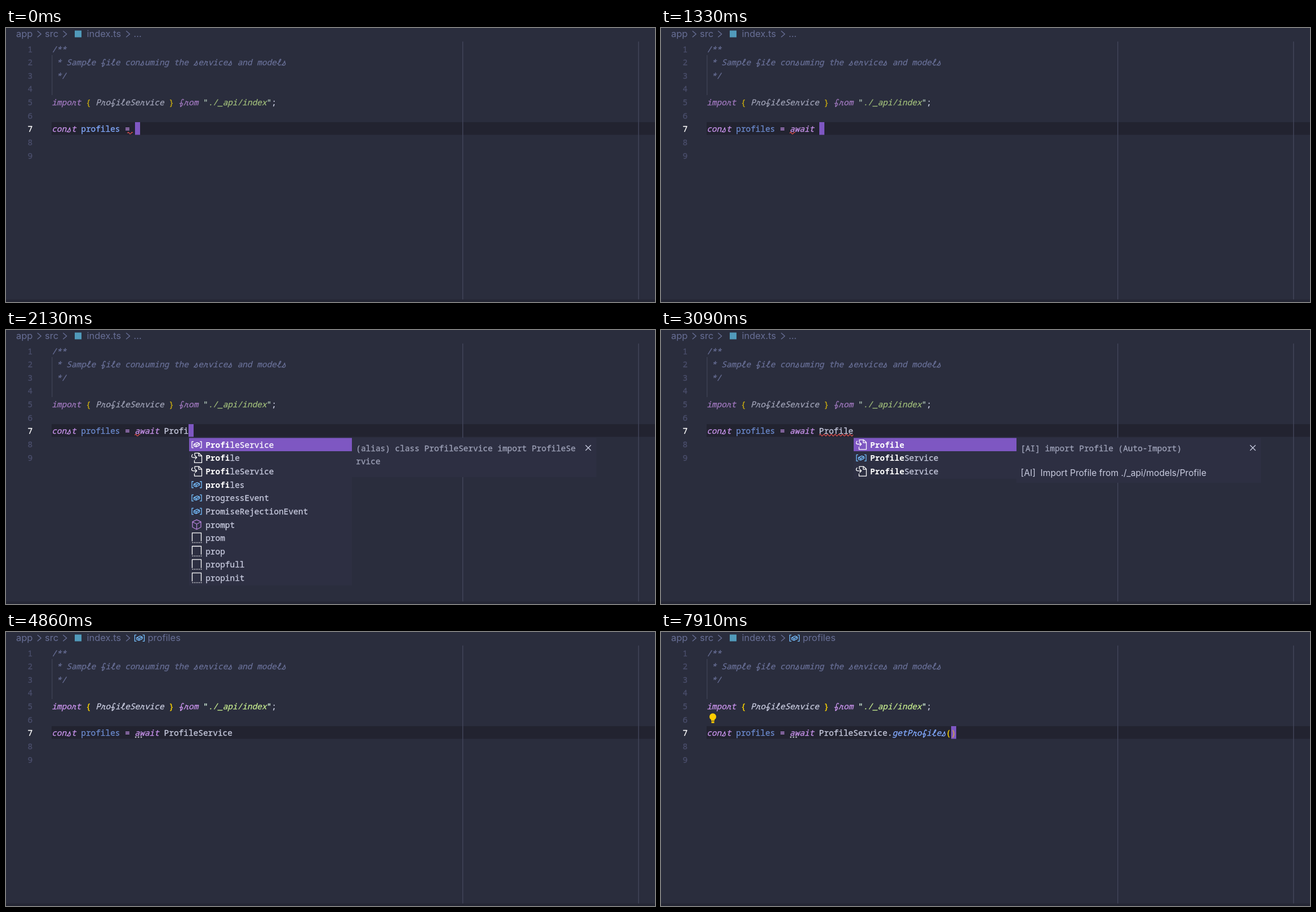
These frames come from a looping animation (1152x486 px, 7990 ms). An HTML page with a canvas:

```html
<!DOCTYPE html>
<html lang="en">
<head>
<meta charset="utf-8">
<title>Editor autocomplete</title>
<style>
html, body { margin: 0; width: 100%; height: 100%; overflow: hidden; background: #2a2d3d; }
canvas { display: block; width: 1152px; height: 486px; }
</style>
</head>
<body>
<canvas id="stage"></canvas>
<script>
const W = 1152, H = 486, LOOP = 7990;
const CHAR = 8.67, LINE = 23.65, LEFT = 81.2, FIRST = 42.5;
const MONO = '"Noto Sans Mono", "DejaVu Sans Mono", monospace';
const SANS = 'Inter, Roboto, sans-serif';
const SIZE = CHAR / 0.6;
const C = {
  bg: '#2a2d3d', line: '#222330', panel: '#2d2f42', foot: '#242634', ruler: '#414459',
  muted: '#676e95', number: '#4b4f6d', text: '#c8cbdf', detail: '#9ea2b8', keyword: '#c792ea',
  name: '#82aaff', string: '#c3e88d', quote: '#d9f5dd', gold: '#ffd700', accent: '#7e57c2',
  error: '#ef5350', blue: '#75beff', violet: '#b180d7', white: '#ffffff'
};

const canvas = document.getElementById('stage');
const ctx = canvas.getContext('2d');
const ratio = window.devicePixelRatio || 1;
canvas.width = W * ratio;
canvas.height = H * ratio;

const ICONS = {
  method: ['M0-8.5 7.5-5V4.5L0 8.5-7.5 4.5V-5ZM-7.5-5 0-1 7.5-5M0-1V8.5', C.violet],
  field: ['M-8.5-2 2-6.5 8.5-3.5V3L-2 7.5-8.5 4.5ZM-8.5-2-2 1.2 8.5-3.5M-2 1.2V7.5', C.blue],
  alias: ['M-5.5-5.5H-8.5V5.5H-5.5M5.5-5.5H8.5V5.5H5.5M-5-.8 1-3.6 5-2V1L-1 4-5 2.4ZM-5-.8-1 .9 5-2M-1 .9V4', C.blue],
  link: ['M-3.5-4V-8.5H4L9-4V8.5H-4V4M3.5-8.5V-3.5H9M-7-6.5C-10-4-9.5-.8-6-.8H0M-3-4 .2-.8-3 2.4', C.white],
  snippet: ['M-8 6V-9H8V6M-8 8.3h1.5m1.6 0h1.5m1.6 0h1.5m1.6 0h1.5m1.6 0h1.5m1.6 0h1.5', C.white],
  keyword: ['M-8.5-7.5H0V-4H-8.5ZM3-5.7H9M-9-.6H1M4-.6H9M-9 3.2H-4M-1 3.2H4M-9 6.8H0M3 6.8H9', C.white]
};
for (const icon of Object.values(ICONS)) icon[0] = new Path2D(icon[0]);

// Script letterforms, upright on the baseline; slanted when drawn.
const SCRIPT = {
  s: new Path2D('M.8-.3C2.8-2 4.2-4.5 4.4-7.6C4.8-5 7-3.8 6.6-1.6C6.2.6 2.9.5 2-1'),
  f: new Path2D('M6.8-9.4C6-11.6 3.6-11 3.4-8V2.2C3.8 3.2 6.6 0 6.4-2.6C6-4.4 3.6-4 1-3.4'),
  r: new Path2D('M.8-.3C2.4-2 3-5 2.9-7.6C3.6-6.2 5-6 6.6-6.4C5.8-4 5.4-.4 6.8-.1L7.8-.7'),
  l: new Path2D('M1-2.5C4.5-5 7-9.5 5.4-10.8C3.8-11.4 3.2-7 3.2-3C3.2.4 5.4.6 7.4-1')
};

const rows = (kind, names) => names.split(' ').map(name => [kind, name]);
const aliasDetail = ['(alias) class ProfileService import ProfileSe', 'rvice'];

const POPUPS = {
  a: {
    rows: [...rows('alias', 'AbortController AbortSignal AbstractRange addEventListener alert AnalyserNode Animation Array ArrayBuffer Attr Audio'),
      ['keyword', 'async'], ['keyword', 'await']],
    detail: ['var AbortController: { new(): AbortControlle', 'r; prototype: AbortController; }'],
    bottom: 261, scroll: true
  },
  await2: { rows: [['keyword', 'await'], ['snippet', '*a*sync *a*rro*w* funct…', 'Async Fu…']] },
  await1: { rows: [['keyword', 'await']] },
  pro: {
    rows: [...rows('alias', 'ProfileService ProcessingInstruction ProgressEvent Promise PromiseRejectionEvent Proxy'),
      ...rows('link', 'ProblemDetails Profile ProfileService'), ['method', 'prompt'],
      ['snippet', 'prom', 'promise'], ['snippet', 'prop', 'Define a full property'], ['snippet', 'propfull']],
    detail: aliasDetail, bottom: 261, scroll: true
  },
  prof: {
    rows: [['alias', 'ProfileService'], ...rows('link', 'Profile ProfileService'),
      ...rows('alias', 'profiles ProgressEvent PromiseRejectionEvent'),
      ...rows('method', 'prompt'), ...rows('snippet', 'prom prop propfull propinit')],
    detail: aliasDetail, bottom: 261
  },
  profile: {
    rows: [['link', 'Profile'], ['alias', 'ProfileService'], ['link', 'ProfileService']],
    detail: ['[AI] import Profile (Auto-Import)'],
    docs: ['[AI]  Import Profile from ./_api/models/Profile'], bottom: 271
  },
  service: { rows: [['alias', 'ProfileService'], ['link', 'ProfileService']], detail: aliasDetail, bottom: 261 },
  members: {
    rows: [['method', 'getProfiles'], ['alias', 'Symbol'], ['method', 'apply'], ['field', 'arguments'],
      ...rows('method', 'bind call'), ...rows('field', 'caller length name prototype'), ['method', 'toString']],
    detail: ['(method) ProfileService.getProfiles(): Cancel', 'ablePromise<Profile[]>'],
    docs: ['Gets the profiles from the backend', '@returns — Profile Success', '@throws — ApiError'], bottom: 374
  }
};

// Each step changes only the listed parts of the state.
const STEPS = [
  [0, { text: '', caret: true, waves: [[215.5, 225]] }],
  [270, { text: 'a' }],
  [360, { popup: 'a' }],
  [620, { text: 'aw', popup: 'await2' }],
  [710, { unused: true, waves: [[228.5, 238]] }],
  [800, { text: 'awa' }],
  [1070, { text: 'awai', popup: 'await1' }],
  [1150, { text: 'await' }],
  [1330, { text: 'await ', popup: null }],
  [1690, { text: 'await P', popup: 'pro' }],
  [1770, { text: 'await Pr' }],
  [1860, { text: 'await Pro' }],
  [2040, { text: 'await Prof', popup: 'prof' }],
  [2130, { text: 'await Profi' }],
  [2390, { text: 'await Profil' }],
  [2480, { popup: 'profile' }],
  [2650, { text: 'await Profile' }],
  [2830, { waves: [[228.5, 238], [281, 332]] }],
  [3010, { caret: false }],
  [3090, { waves: [[281, 341]] }],
  [3170, { symbol: true }],
  [3260, { bulb: true }],
  [3620, { caret: true }],
  [3800, { text: 'await ProfileS', popup: 'service' }],
  [3890, { text: 'await ProfileSe' }],
  [3970, { text: 'await ProfileSer' }],
  [4240, { text: 'await ProfileService', popup: null }],
  [4330, { bulb: false }],
  [4680, { imported: true, waves: [], dots: true }],
  [4860, { caret: false }],
  [4950, { text: 'await ProfileService.', caret: true, popup: 'members' }],
  [5300, { unused: false, dots: false, waves: [[406, 414]] }],
  [5480, { caret: false }],
  [5930, { caret: true }],
  [6470, { caret: false }],
  [6920, { caret: true }],
  [7100, { text: 'await ProfileService.getProfiles', popup: null }],
  [7460, { unused: true, waves: [], dots: true }],
  [7640, { caret: false }],
  [7730, { bulb: true }],
  [7910, { text: 'await ProfileService.getProfiles()', caret: true }]
];

const stateAt = t => Object.assign({}, ...STEPS.filter(s => s[0] <= t).map(s => s[1]));
const column = n => LEFT + CHAR * n;
const baseline = line => FIRST + LINE * (line - 1);

function rect(x, y, w, h, color) {
  ctx.fillStyle = color;
  ctx.fillRect(x, y, w, h);
}

function print(str, x, y, color, style = '', size = SIZE, family = MONO) {
  ctx.font = `${style} ${size}px ${family}`;
  ctx.fillStyle = color;
  ctx.fillText(str, x, y);
}

// Regular code text with slightly thickened strokes.
function printCode(str, x, y, color, style = '') {
  print(str, x, y, color, style);
  ctx.strokeStyle = color;
  ctx.lineWidth = 0.3;
  ctx.strokeText(str, x, y);
}

function printScript(str, x, y, color) {
  [...str].forEach((letter, i) => {
    const left = x + i * CHAR;
    const path = SCRIPT[letter];
    if (!path) {
      printCode(letter, left, y, color, 'italic');
      return;
    }
    ctx.save();
    ctx.transform(1, 0, -0.2, 1, left, y);
    ctx.lineCap = 'round';
    ctx.strokeStyle = color;
    ctx.lineWidth = 1.4;
    ctx.stroke(path);
    ctx.restore();
  });
}

function code(str, line, col, color, style, alpha = 1) {
  const show = style === 'italic' ? printScript : printCode;
  ctx.globalAlpha = alpha;
  show(str, column(col), baseline(line), color);
  ctx.globalAlpha = 1;
}

function stroke(path, x, y, color, width = 1.3) {
  ctx.save();
  ctx.translate(x, y);
  ctx.strokeStyle = color;
  ctx.lineWidth = width;
  ctx.stroke(path);
  ctx.restore();
}

const chevron = new Path2D('M-3.2-5.5 3.2 0-3.2 5.5');
const cross = new Path2D('M-4.8-4.8 4.8 4.8M4.8-4.8-4.8 4.8');

function drawCrumbs(s) {
  const label = (str, x) => print(str, x, 16.2, C.muted, '', 16.5, SANS);
  label('app', 18);
  label('src', 69);
  label('index.ts', 143.5);
  for (const x of [59, 104.5, 216.5]) stroke(chevron, x, 10.8, C.muted, 1.4);
  rect(122, 4.5, 12, 12, '#519aba');
  if (s.symbol) {
    stroke(ICONS.alias[0], 237, 10.8, C.blue);
    label('profiles', 251.5);
  } else {
    label('...', 226.5);
  }
}

function drawCode(s) {
  rect(81, 167, W - 81, 22.5, C.line);
  for (const x of [810, 1122]) rect(x, 24, 1.5, H - 24, C.ruler);
  rect(0, 481.5, W, 4.5, C.foot);
  rect(81.3, 48, 1, 71, '#45495f');
  for (let n = 1; n <= 9; n++) printCode(n, 38.4, baseline(n), n === 7 ? C.white : C.number);

  code('/**', 1, 0, C.muted, 'italic');
  code(' * Sample file consuming the services and models', 2, 0, C.muted, 'italic');
  code(' */', 3, 0, C.muted, 'italic');

  const fade = s.imported ? 1 : 0.7;
  code('import', 5, 0, C.keyword, 'italic', fade);
  code('{', 5, 7, C.gold, '', fade);
  code('ProfileService', 5, 9, C.text, 'italic', fade);
  code('}', 5, 24, C.gold, '', fade);
  code('from', 5, 26, C.keyword, 'italic', fade);
  code('"', 5, 31, C.quote, '', fade);
  code('./_api/index', 5, 32, C.string, 'italic', fade);
  code('"', 5, 44, C.quote, '', fade);
  code(';', 5, 45, C.text);

  code('const', 7, 0, C.keyword, 'italic');
  code('profiles', 7, 6, C.name, '', s.unused ? 0.72 : 1);
  code('=', 7, 15, C.keyword);
}

function drawTyped(s, col) {
  const called = s.text.endsWith('()');
  const caretCol = called ? col - 1 : col;
  if (s.caret) rect(Math.round(column(caretCol)), 167, 9, 22.5, C.accent);
  if (!s.text.includes(' ')) {
    code(s.text, 7, 17, C.text);
    return;
  }
  code('await', 7, 17, C.keyword, 'italic');
  const rest = s.text.slice(6);
  if (!called) {
    code(rest, 7, 23, C.text);
    return;
  }
  code('ProfileService.', 7, 23, C.text);
  code('getProfiles', 7, 38, C.name, 'italic');
  code('(', 7, 49, C.gold);
  code(')', 7, 50, C.gold, '', 0.6);
}

function drawMarks(s) {
  ctx.strokeStyle = C.error;
  ctx.lineWidth = 1.2;
  for (const [from, to] of s.waves) {
    ctx.beginPath();
    for (let x = from; x <= to; x += 0.5) ctx.lineTo(x, 186.5 - 1.5 * Math.sin((x - from) * Math.PI / 3.3));
    ctx.stroke();
  }
  if (s.dots) for (let i = 0; i < 3; i++) rect(229 + i * 4.9, 185.3, 2.5, 2.3, '#b9bac4');
  if (s.bulb) {
    ctx.fillStyle = '#ffcc00';
    ctx.beginPath();
    ctx.arc(92, 150.3, 6, 0, Math.PI * 2);
    ctx.fill();
    ctx.fillRect(89, 154, 6, 3.5);
    ctx.fillRect(89.5, 158.5, 5, 3);
  }
}

function drawLabel(name, word, x, y, color) {
  const hit = word && name.toLowerCase().startsWith(word.toLowerCase()) ? word.length : 0;
  const marked = name.includes('*') ? name : `*${name.slice(0, hit)}*${name.slice(hit)}`;
  let col = 0;
  marked.split('*').forEach((part, i) => {
    const left = x + col * CHAR;
    if (i % 2) print(part, left, y, C.white, 'bold');
    else printCode(part, left, y, color);
    col += part.length;
  });
}

function drawDetail(p, x) {
  rect(x + 289, 191, 434, p.bottom - 191, C.panel);
  p.detail.forEach((str, i) => printCode(str, x + 296.3, 214.5 + i * LINE, C.detail));
  const top = 214.5 + p.detail.length * LINE + 20.5;
  (p.docs || []).forEach((str, i) => {
    const [tag] = str.match(/^@\w+/) || [''];
    print(tag, x + 296.5, top + i * 39.2, C.text, 'italic', 15.6, SANS);
    const shift = ctx.measureText(tag).width;
    print(str.slice(tag.length), x + 296.5 + shift, top + i * 39.2, C.text, '', 15.6, SANS);
  });
  stroke(cross, x + 708.5, 209, C.text, 1.3);
}

function drawPopup(s, col) {
  const p = POPUPS[s.popup];
  const x = Math.round(column(col) + 1);
  const word = s.text.match(/\w*$/)[0];
  const height = Math.min(p.rows.length * LINE + 2, 287);
  ctx.save();
  ctx.beginPath();
  ctx.rect(x, 191, 289, height);
  ctx.clip();
  rect(x, 191, 289, height, C.panel);
  rect(x, 191.5, 289, 23.5, C.accent);
  p.rows.forEach(([kind, name, hint], i) => {
    const y = 203.3 + i * LINE;
    const [path, color] = ICONS[kind];
    const plain = i === 0 && kind === 'method';
    stroke(path, x + 13.5, y, i ? color : C.white);
    drawLabel(name, word, x + 29.2, y + 5.3, i ? C.text : C.white);
    if (hint) {
      const size = 12.27;
      const left = x + (p.scroll ? 276 : 272.5) - hint.length * size * 0.6;
      print(hint, left, y + 3.8, C.detail, '', size);
    }
  });
  if (p.scroll) rect(x + 276, 191.5, 13, 54.5, 'rgba(88, 66, 140, 0.7)');
  ctx.restore();
  if (p.detail) drawDetail(p, x);
}

function draw(t) {
  const s = stateAt(t);
  const col = 17 + s.text.length;
  ctx.setTransform(ratio, 0, 0, ratio, 0, 0);
  ctx.lineJoin = 'round';
  rect(0, 0, W, H, C.bg);
  drawCrumbs(s);
  drawCode(s);
  drawTyped(s, col);
  drawMarks(s);
  if (s.popup) drawPopup(s, col);
}

const start = performance.now();
function tick() {
  draw((performance.now() - start) % LOOP);
  requestAnimationFrame(tick);
}
tick();
</script>
</body>
</html>
```
